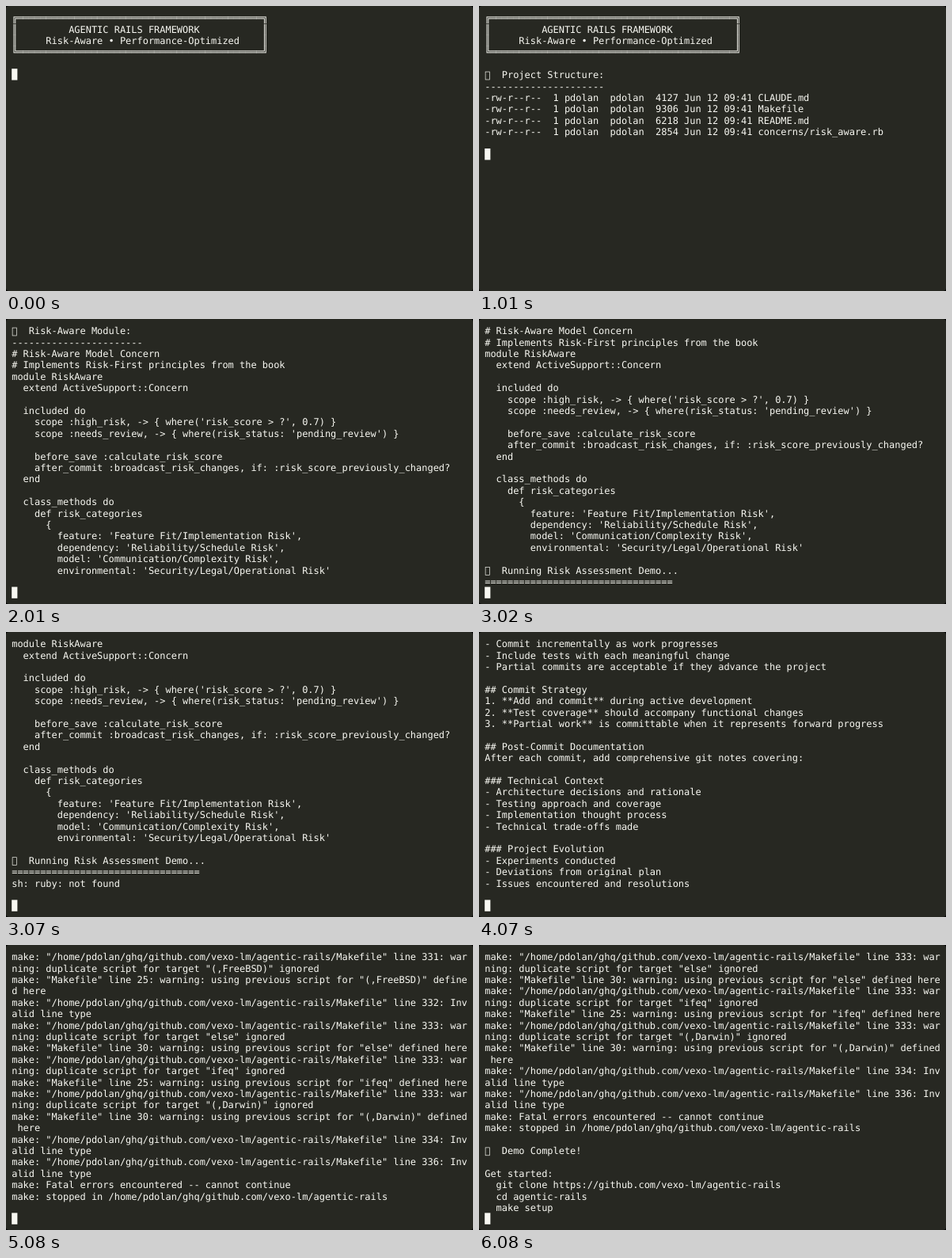
Write an HTML page that moves like this. It is 590 by 360 pixels and loops after 9.08 s.

```html
<!DOCTYPE html>
<html lang="en">
<head>
<meta charset="utf-8">
<title>Terminal demo</title>
<style>
  html, body { margin: 0; width: 100%; height: 100%; overflow: hidden; background: #000; }
  svg { display: block; width: 590px; height: 360px; }
  text {
    font: 12px "DejaVu Sans Mono", monospace;
    fill: #f8f8f2;
    white-space: pre;
    text-rendering: geometricPrecision;
  }
  .back { fill: #272822; }
  .cursor { fill: #f8f8f2; }
  .tofu { fill: none; stroke: #f8f8f2; stroke-width: .67; }
  .screen { visibility: hidden; }
  .screen.on { visibility: visible; }
</style>
</head>
<body>
<svg id="term" viewBox="0 0 590 360">
  <rect class="back" width="590" height="360" rx="4"/>
</svg>
<script>
const COLS = 80, ROWS = 24, LOOP = 9080;
const CELL = 590 / (COLS + 2), LINE = 360 / (ROWS + 1);
const ICON = '\u25af'; // stands for a missing emoji glyph

const dir = '/home/pdolan/ghq/github.com/vexo-lm/agentic-rails';
const bar = '═'.repeat(43);
const at = (line, msg) => `make: "${dir}/Makefile" line ${line}: ${msg}`;
const bad = line => at(line, 'Invalid line type');
const twice = (line, first, name) => [
  at(line, `warning: duplicate script for target "${name}" ignored`),
  `make: "Makefile" line ${first}: warning: using previous script for "${name}" defined here`
];
const file = (size, time, name) => `-rw-r--r--  1 pdolan  pdolan  ${size} Jun 12 ${time} ${name}`;

// Each step prints its lines at the given time.
const steps = [
  [0, [
    `╔${bar}╗`,
    '║' + ' '.repeat(9) + 'AGENTIC RAILS FRAMEWORK' + ' '.repeat(11) + '║',
    '║     Risk-Aware • Performance-Optimized    ║',
    `╚${bar}╝`,
    ''
  ]],
  [1010, [
    ICON + '  Project Structure:',
    '-'.repeat(21),
    file(4127, '09:41', 'CLAUDE.md'),
    file(9306, '09:41', 'Makefile'),
    file(6218, '09:41', 'README.md'),
    file(2854, '09:41', 'concerns/risk_aware.rb'),
    ''
  ]],
  [2010, [
    ICON + '  Risk-Aware Module:',
    '-'.repeat(23),
    '# Risk-Aware Model Concern',
    '# Implements Risk-First principles from the book',
    'module RiskAware',
    '  extend ActiveSupport::Concern',
    '',
    '  included do',
    "    scope :high_risk, -> { where('risk_score > ?', 0.7) }",
    "    scope :needs_review, -> { where(risk_status: 'pending_review') }",
    '',
    '    before_save :calculate_risk_score',
    '    after_commit :broadcast_risk_changes, if: :risk_score_previously_changed?',
    '  end',
    '',
    '  class_methods do',
    '    def risk_categories',
    '      {',
    "        feature: 'Feature Fit/Implementation Risk',",
    "        dependency: 'Reliability/Schedule Risk',",
    "        model: 'Communication/Complexity Risk',",
    "        environmental: 'Security/Legal/Operational Risk'",
    ''
  ]],
  [3020, [
    ICON + '  Running Risk Assessment Demo...',
    '='.repeat(33)
  ]],
  [3070, [
    'sh: ruby: not found',
    ''
  ]],
  [4070, [
    '- Commit incrementally as work progresses',
    '- Include tests with each meaningful change',
    '- Partial commits are acceptable if they advance the project',
    '',
    '## Commit Strategy',
    '1. **Add and commit** during active development',
    '2. **Test coverage** should accompany functional changes',
    '3. **Partial work** is committable when it represents forward progress',
    '',
    '## Post-Commit Documentation',
    'After each commit, add comprehensive git notes covering:',
    '',
    '### Technical Context',
    '- Architecture decisions and rationale',
    '- Testing approach and coverage',
    '- Implementation thought process',
    '- Technical trade-offs made',
    '',
    '### Project Evolution',
    '- Experiments conducted',
    '- Deviations from original plan',
    '- Issues encountered and resolutions',
    ''
  ]],
  [5080, [
    ...twice(331, 25, '(,FreeBSD)'),
    bad(332),
    ...twice(333, 30, 'else'),
    ...twice(333, 25, 'ifeq'),
    ...twice(333, 30, '(,Darwin)'),
    bad(334),
    bad(336),
    'make: Fatal errors encountered -- cannot continue',
    'make: stopped in ' + dir,
    ''
  ]],
  [6080, [
    ICON + '  Demo Complete!',
    '',
    'Get started:',
    '  git clone https://github.com/vexo-lm/agentic-rails',
    '  cd agentic-rails',
    '  make setup'
  ]]
];

function add(parent, tag, attrs) {
  const el = document.createElementNS('http://www.w3.org/2000/svg', tag);
  for (const key in attrs) el.setAttribute(key, attrs[key]);
  return parent.appendChild(el);
}

const left = col => (col + .5) * CELL + CELL / 2;
const top_ = row => (row + .5) * LINE;
const wrap = line => line.match(/.{1,80}/gu) || [''];

function drawLine(screen, line, row) {
  const base = top_(row) + 12;
  if (line.startsWith(ICON)) {
    add(screen, 'rect', { class: 'tofu', x: left(0) + .93, y: base - 8.12, width: 5.33, height: 9.9 });
    line = line.replace(ICON, ' ');
  }
  if (!line.trim()) return;
  const x = [...line].map((_, col) => left(col).toFixed(2)).join(' ');
  add(screen, 'text', { x, y: base.toFixed(2) }).textContent = line;
}

const term = document.getElementById('term');
let log = [];
const screens = steps.map(([, lines]) => {
  log = log.concat(lines.flatMap(wrap)).slice(1 - ROWS);
  const screen = add(term, 'g', { class: 'screen' });
  log.forEach((line, row) => drawLine(screen, line, row));
  add(screen, 'rect', { class: 'cursor', x: left(0), y: top_(log.length), width: CELL, height: LINE });
  return screen;
});

function show() {
  const t = performance.now() % LOOP;
  const now = steps.filter(([start]) => start <= t).length - 1;
  screens.forEach((screen, i) => screen.classList.toggle('on', i === now));
  requestAnimationFrame(show);
}
show();
</script>
</body>
</html>
```
